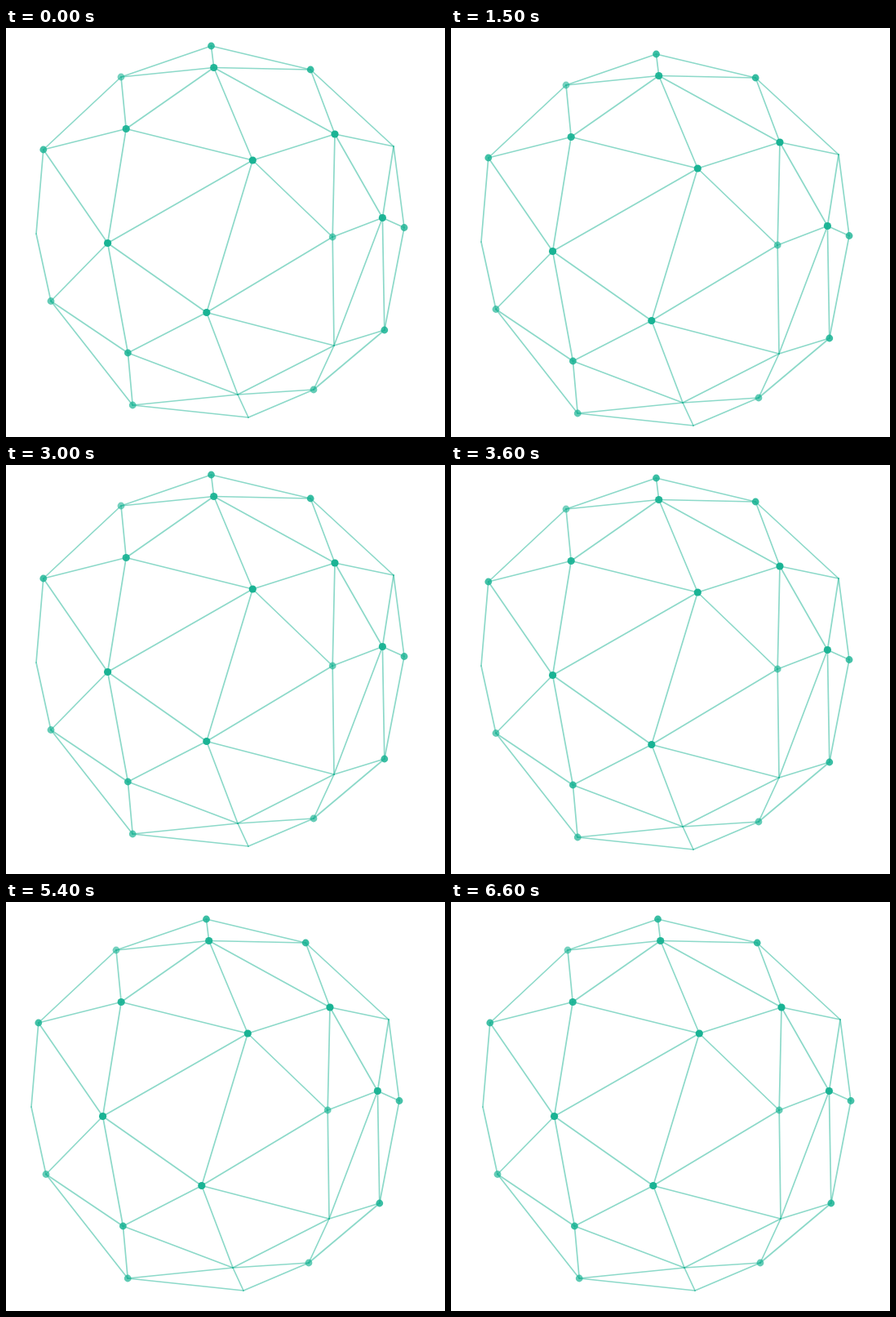
Write an HTML page that moves like this. It is 538x501 px and loops after 6900 ms.

```html
<!DOCTYPE html>
<html lang="en">
<head>
<meta charset="utf-8">
<title>Wireframe sphere</title>
<style>
  html, body { margin: 0; width: 100%; height: 100%; overflow: hidden; background: #fff; }
  svg { display: block; width: 538px; height: 501px; }
  #mesh { animation: drift 6900ms -2ms infinite; }
  line { stroke: #1ab394; stroke-opacity: .5; stroke-width: 1.7; stroke-linecap: round; }
  circle { fill: #1ab394; }

  /* Stepped nudges: down, up, back to the middle, then left and right */
  @keyframes drift {
    0%       { transform: translate(0, 0);      animation-timing-function: steps(5, end); }
    21.7391% { transform: translate(0, 10px);   animation-timing-function: steps(5, end); }
    43.4783% { transform: translate(0, -10px);  animation-timing-function: steps(4, end); }
    60.8696% { transform: translate(0, -2px);   animation-timing-function: step-end; }
    65.2174% { transform: translate(0, -1px);   animation-timing-function: steps(2, end); }
    73.9130% { transform: translate(-8px, -1px); animation-timing-function: steps(5, end); }
    95.6522% { transform: translate(2px, -1px); animation-timing-function: step-end; }
    100%     { transform: translate(0, 0); }
  }
</style>
</head>
<body>
<svg viewBox="0 0 538 501"><g id="mesh"></g></svg>
<script>
  // x, y, dot opacity (none when omitted)
  const nodes = {
    A: [251.5, 22, .85], B: [254.7, 48.5, .95], C: [373.2, 51, .87],
    D: [141, 60, .6],    E: [147.2, 123.5, .93], F: [45.8, 149, .82],
    G: [302.3, 162, 1],  H: [403, 130, 1],      I: [475, 145],
    J: [461.4, 232.5, .97], K: [488, 244.5, .8], L: [400.2, 256, .65],
    M: [124.6, 263.5, 1], N: [37, 252],         O: [55, 334.5, .67],
    P: [245.8, 348.5, 1], Q: [149.4, 398, .85], R: [155.2, 462, .7],
    S: [284, 449],       T: [297, 477],         U: [377, 443, .67],
    V: [402, 389],       W: [463.8, 370, .85]
  };
  const edges = 'AB AC AD BC BD BE BG BH CH CI DE DF EF EG EM FM FN NO OM OQ OR ' +
    'MG MP MQ GH GL GP HI HL HJ IJ IK JK JL JV JW KW LP LV WV WU VP VS VU ' +
    'US UT ST SR RT SP SQ QP QR';

  const mesh = document.getElementById('mesh');
  const add = (tag, attrs) => {
    const el = document.createElementNS(mesh.namespaceURI, tag);
    for (const key in attrs) el.setAttribute(key, attrs[key]);
    mesh.append(el);
  };

  for (const [a, b] of edges.split(' ')) {
    const [x1, y1] = nodes[a], [x2, y2] = nodes[b];
    add('line', { x1, y1, x2, y2 });
  }
  for (const [cx, cy, opacity] of Object.values(nodes)) {
    if (opacity) add('circle', { cx, cy, r: opacity > .9 ? 4.6 : 4.4, opacity });
  }
</script>
</body>
</html>
```
